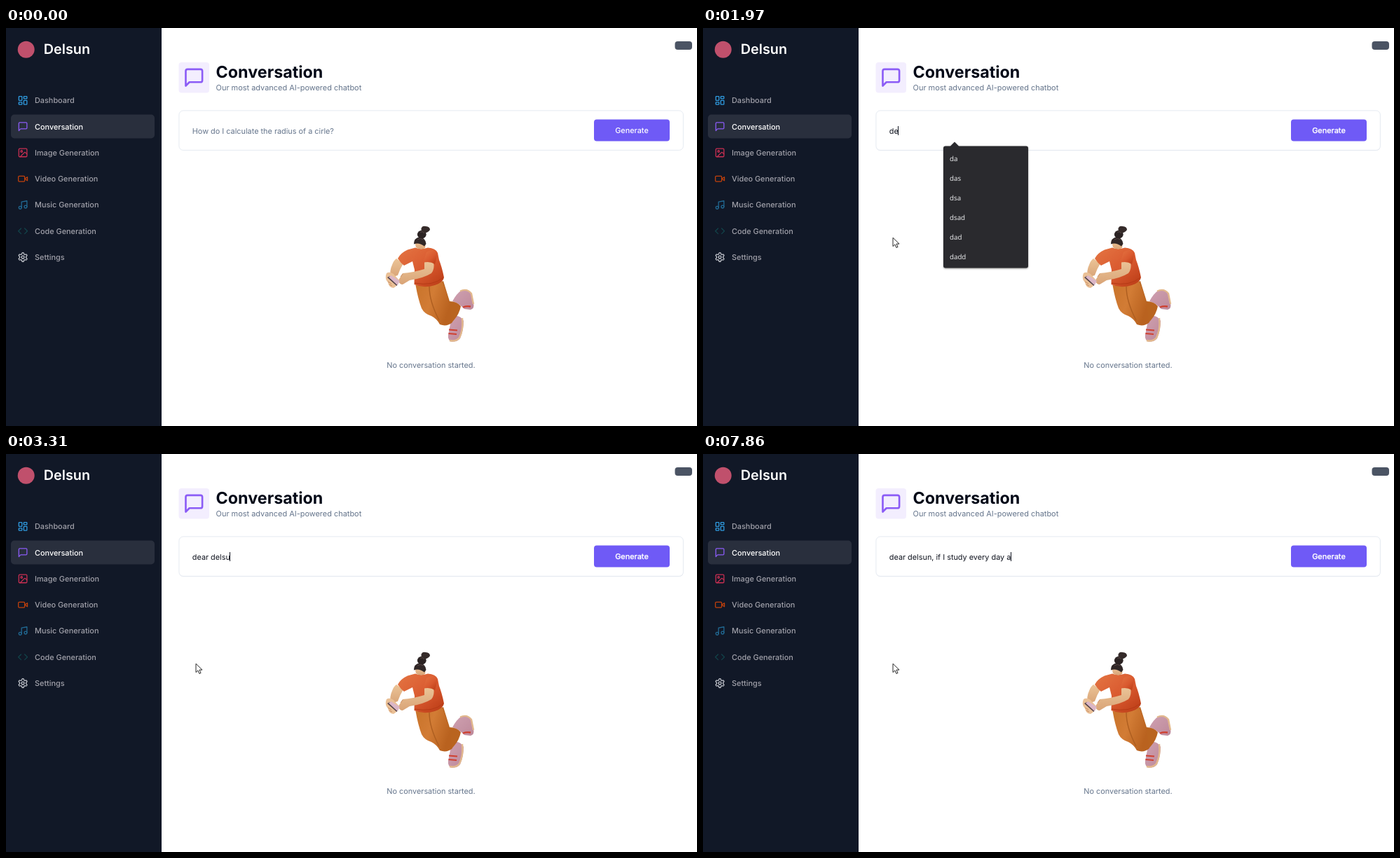
These frames come from a looping animation (986x568 px, 7990 ms). An HTML page:

```html
<!DOCTYPE html>
<html lang="en">
<head>
<meta charset="utf-8">
<title>Chatbot</title>
<style>
  html, body { margin: 0; width: 100%; height: 100%; overflow: hidden; background: #fff; }
  svg { display: block; width: 100vw; height: 100vh; }
  text { font: 400 10.87px Inter, sans-serif; white-space: pre; text-rendering: geometricPrecision; }
  .muted { fill: #64748b; }
  .medium { font-weight: 500; }
  .option { font: 400 9.75px "Open Sans", sans-serif; fill: #f3f4f6; }
  .icon { fill: none; stroke-width: 2; stroke-linecap: round; stroke-linejoin: round; }
</style>
</head>
<body>
<svg viewBox="0 0 986 568">
  <defs>
    <linearGradient id="shirt" x1="0" y1="0" x2="1" y2="1">
      <stop offset=".1" stop-color="#e2703f"/><stop offset=".55" stop-color="#d9592f"/><stop offset="1" stop-color="#b83a14"/>
    </linearGradient>
    <linearGradient id="pants" x1="0" y1="0" x2="1" y2=".4">
      <stop offset="0" stop-color="#c8732a"/><stop offset=".5" stop-color="#d27c35"/><stop offset="1" stop-color="#b9621f"/>
    </linearGradient>
    <linearGradient id="skin" x1="0" y1="0" x2="0" y2="1">
      <stop offset="0" stop-color="#ebc497"/><stop offset="1" stop-color="#d9a477"/>
    </linearGradient>
    <linearGradient id="shoe" x1="0" y1="0" x2="1" y2="1">
      <stop offset="0" stop-color="#cfa0b0"/><stop offset="1" stop-color="#bd8a9b"/>
    </linearGradient>
    <filter id="shade" x="-10%" y="-10%" width="120%" height="120%">
      <feDropShadow dx="0" dy="1" stdDeviation="1.2" flood-opacity=".4"/>
    </filter>
  </defs>

  <!-- sidebar -->
  <rect width="222" height="568" fill="#111827"/>
  <circle cx="28.7" cy="30.7" r="12" fill="#c0506c"/>
  <text x="53.8" y="37" fill="#fff" style="font-size:19.8px;font-weight:600">Delsun</text>
  <rect x="7" y="123.5" width="205" height="34" rx="5" fill="#292f3d"/>
  <g id="nav"></g>

  <!-- header -->
  <rect x="954.5" y="19" width="24.5" height="12" rx="4" fill="#4b5464"/>
  <rect x="246.5" y="49" width="43.5" height="43.5" rx="4" fill="#f3eefe"/>
  <g id="badge"></g>
  <text x="299.6" y="71.2" fill="#020817" style="font-size:23.3px;font-weight:700">Conversation</text>
  <text x="299.6" y="88.5" class="muted" style="font-size:10.95px">Our most advanced AI-powered chatbot</text>

  <!-- form -->
  <rect id="focus" x="247" y="118.8" width="719.5" height="56.5" rx="6" fill="#eceef2"/>
  <rect x="246.9" y="117.9" width="719.5" height="56.5" rx="6" fill="#fff" stroke="#e2e8f0" stroke-width=".9"/>
  <text id="hint" x="265.8" y="150.6" class="muted">How do I calculate the radius of a cirle?</text>
  <text id="typed" x="265.8" y="150.6" fill="#10141f"></text>
  <rect id="caret" y="140" width="1" height="13" fill="#10141f"/>
  <rect x="839" y="130.5" width="108" height="31" rx="4" fill="#6f5af6"/>
  <text id="send" x="893" y="150.1" class="medium" text-anchor="middle" fill="#fff" stroke="#fff">Generate</text>

  <!-- illustration -->
  <g>
    <path fill="url(#shoe)" d="M636 412Q647 408 653 418Q653 431 648 443Q643 449 634 447Q629 443 632 433Z"/>
    <path fill="none" stroke="#e2b88d" stroke-width="2.4" d="M651 414Q653 430 647 442Q642 448 633 446"/>
    <path stroke="#cf4030" stroke-width="2" d="M632 430.5l12 1M631.5 436l11.5 1"/>
    <path fill="url(#shoe)" d="M637 390Q643 379 649 375Q657 371 664 378L667 393Q669 400 663 402L654 401Q645 392 637 390Z"/>
    <path fill="none" stroke="#e2b88d" stroke-width="2.4" d="M648 375.5Q658 371 664 379L667 394"/>
    <path fill="none" stroke="#cf4030" stroke-width="2.4" d="M652 398.5Q657 396.5 663 397.5"/>
    <path fill="#b9641f" d="M606 369L624 361L633 390Q643 390 649 397Q647 408 639 417Q634 424 624 424L610 410Z"/>
    <path fill="url(#pants)" d="M584.5 367Q606 369 622 361Q629 377 633 396L637 420Q629 427 619 423Q615 415 607 411Q597 408 593 400Q588 387 584.5 367Z"/>
    <path fill="none" stroke="#ad5e20" stroke-width="1.4" d="M604 369Q604 390 618 417"/>
    <path fill="url(#skin)" d="M557 329L567 336Q562 344 559 353L549 356Q547 346 551 338Q553 332 557 329Z"/>
    <path fill="url(#shirt)" d="M559 329Q563 321 573 316.5L584 313.5Q592 317 602 313.5Q613 314 616 321L618 331Q622 341 625 356Q624 363 612 367Q596 372 582.5 366L583 345L580 333L568 339Q563 335 559 329Z"/>
    <path fill="none" stroke="#b53a16" stroke-width="1" d="M583 364Q609 369 624 356"/>
    <path fill="url(#skin)" d="M583 304Q590 303 599 306L598 314Q591 317.5 585 313Z"/>
    <path fill="#302727" d="M582 308.5Q582 299.5 590 298.5Q598 298.5 599.5 308L597 311.5Q589 305.5 582 308.5Z"/>
    <ellipse cx="593.3" cy="294.6" rx="6.4" ry="5.9" fill="#2b2323"/>
    <path fill="#352b2a" d="M592.5 286Q594 281.5 599 283Q605 283.5 605 288Q602 293 596 292Q592 291 592.5 286Z"/>
    <path fill="none" stroke="#554543" stroke-width="1" d="M587 302Q591 299 596 302M591 291Q595 290 597 293"/>
    <path fill="url(#skin)" d="M597 334Q604 332 610 334Q612 344 607 350Q596 357 576 360L566 366Q561 366 560 360L566 350Q581 349 597 344Z"/>
    <path fill="url(#shirt)" d="M595 335L600 320Q611 313 616 322L612 337Q604 332 595 335Z"/>
    <path fill="#eac096" d="M543 350Q547 347 553 351L561 360Q559 368 553 371Q546 370 545 363Q541 359 542 353Z"/>
    <path fill="#514249" d="M544 356L547.5 354L560 364L557.5 368Z"/>
    <path fill="#dbb6c6" d="M546 355.5L549.5 353L562 361L558.5 367Z"/>
    <path fill="none" stroke="#c98e66" stroke-width="1" d="M545 362l5 3M547 366l4 2M566 351l-3 4"/>
  </g>
  <text x="606.5" y="484.8" class="muted" text-anchor="middle">No conversation started.</text>

  <g id="popups"></g>
  <path id="mouse" d="M0 0V12.3L2.9 9.6L4.9 14.2L7 13.2L5 8.8H9Z" fill="#fff" stroke="#111" stroke-width=".9"/>
</svg>
<script>
const LOOP = 7990;
const byId = id => document.getElementById(id);
const clamp = v => Math.min(1, Math.max(0, v));

function gear() {
  let d = "";
  for (let i = 0; i < 72; i++) {
    const a = i / 72 * 2 * Math.PI;
    const r = 8.5 + 1.5 * Math.tanh(2 * Math.cos(6 * a)) / Math.tanh(2);
    d += (i ? "L" : "M") + (12 + r * Math.sin(a)).toFixed(2) + " " + (12 - r * Math.cos(a)).toFixed(2);
  }
  return `<path d="${d}Z"/><circle cx="12" cy="12" r="3"/>`;
}

const box = (x, y, w, h, r) => `<rect x="${x}" y="${y}" width="${w}" height="${h}" rx="${r}"/>`;
const dot = (x, y, r) => `<circle cx="${x}" cy="${y}" r="${r}"/>`;
const bubble = '<path d="M21 15a2 2 0 0 1-2 2H7l-4 4V5a2 2 0 0 1 2-2h14a2 2 0 0 1 2 2z"/>';

// 24-unit icon centred on a point
const icon = (shape, cx, cy, size, color) =>
  `<g class="icon" stroke="${color}" transform="translate(${cx - size / 2} ${cy - size / 2}) scale(${size / 24})">${shape}</g>`;

const NAV = [
  ["Dashboard", "#2f9be0", box(3, 3, 7, 9, 1) + box(14, 3, 7, 5, 1) + box(14, 12, 7, 9, 1) + box(3, 16, 7, 5, 1)],
  ["Conversation", "#8b5cf6", bubble],
  ["Image Generation", "#c92f52", box(3, 3, 18, 18, 2) + dot(9, 9, 2) + '<path d="m21 15-3.1-3.1a2 2 0 0 0-2.8 0L6 21"/>'],
  ["Video Generation", "#c2410c", box(2, 6, 14, 12, 2) + '<path d="m22 8-6 4 6 4V8Z"/>'],
  ["Music Generation", "#216a94", '<path d="M9 18V5l12-2v13"/>' + dot(6, 18, 3) + dot(18, 16, 3)],
  ["Code Generation", "#12434a", '<path d="m16 18 6-6-6-6M8 6l-6 6 6 6"/>'],
  ["Settings", "#c4c7ce", gear()]
];
byId("nav").innerHTML = NAV.map(([label, color, shape], i) => {
  const y = 103.4 + i * 37.28;
  return icon(shape, 24.1, y, 15.4, color) +
    `<text class="medium" x="41" y="${y + 3.9}" fill="${i === 1 ? "#fff" : "#a1a1aa"}">${label}</text>`;
}).join("");
byId("badge").innerHTML = icon(bubble, 268.3, 70.7, 31.5, "#8b5cf6");

// suggestion lists
const LISTS = [
  { width: 214.5, from: 1020, to: 1500,
    items: ["da", "dsa", "das", "dsad", "a picture of pazo fighting lukoda in a pool", "gardenupstair type beat"] },
  { width: 121, from: 1500, to: 2110,
    items: ["da", "das", "dsa", "dsad", "dad", "dadd"] }
];
for (const list of LISTS) {
  list.node = document.createElementNS("http://www.w3.org/2000/svg", "g");
  list.node.innerHTML =
    `<path filter="url(#shade)" fill="#292a2d" d="M346 168.5H353L359 162.5L365 168.5H${340 + list.width}q3 0 3 3V339.5q0 3-3 3H346q-3 0-3-3V171.5q0-3 3-3Z"/>` +
    list.items.map((s, i) => `<text class="option" x="352" y="${189.6 + 28 * i}">${s}</text>`).join("");
  byId("popups").append(list.node);
}

const MESSAGE = "dear delsun, if I study every day a";
const KEYS = [1500, 1970, 2170, 2310, 2510, 2640, 2840, 2910, 3110, 3310, 3380, 3580,
  3780, 3980, 4050, 4180, 4450, 4520, 4720, 4920, 4990, 5130, 5260, 5330, 5520, 5720,
  5860, 6060, 6130, 6260, 6530, 6660, 6860, 6930, 7860];
const CLICK = 880, BLINK = 520;
const PATH = [[190, 400, 572], [800, 296, 147], [960, 296, 147], [1400, 271, 299.3]];

function mouseAt(t) {
  for (let i = 1; i < PATH.length; i++) {
    const [t0, x0, y0] = PATH[i - 1], [t1, x1, y1] = PATH[i];
    if (t > t1) continue;
    const p = clamp((t - t0) / (t1 - t0)), e = p * p * (3 - 2 * p);
    return [x0 + (x1 - x0) * e, y0 + (y1 - y0) * e];
  }
  return PATH[PATH.length - 1].slice(1);
}

function draw(t) {
  const held = 1970 + Math.floor((t - 1970) / 70) * 70;
  const count = KEYS.filter(k => k <= t).length;
  const typed = byId("typed"), focused = t >= CLICK;

  typed.textContent = MESSAGE.slice(0, count);
  byId("hint").style.display = count ? "none" : "";
  const idle = t - (count ? KEYS[count - 1] : CLICK);
  const caret = byId("caret");
  caret.style.display = focused && idle % (2 * BLINK) < BLINK ? "" : "none";
  caret.setAttribute("x", Math.round(265.3 + (count ? typed.getComputedTextLength() : 0)));

  byId("focus").style.display = focused ? "" : "none";
  byId("send").setAttribute("stroke-width", focused ? .25 : 0);

  LISTS.forEach((list, i) => {
    const alpha = i ? clamp((2110 - held) / 115) : clamp((held - 950) / 140);
    const scale = 1 - .045 * (1 - alpha);
    const cx = 343 + list.width / 2, cy = 255.5;
    list.node.style.display = t >= list.from && t < list.to ? "" : "none";
    list.node.setAttribute("opacity", alpha);
    list.node.setAttribute("transform", `translate(${cx} ${cy}) scale(${scale}) translate(${-cx} ${-cy})`);
  });

  const [x, y] = mouseAt(t);
  byId("mouse").style.display = t >= PATH[0][0] ? "" : "none";
  byId("mouse").setAttribute("transform", `translate(${x} ${y})`);
}

const start = performance.now();
function tick() {
  draw((performance.now() - start) % LOOP);
  requestAnimationFrame(tick);
}
tick();
</script>
</body>
</html>
```
